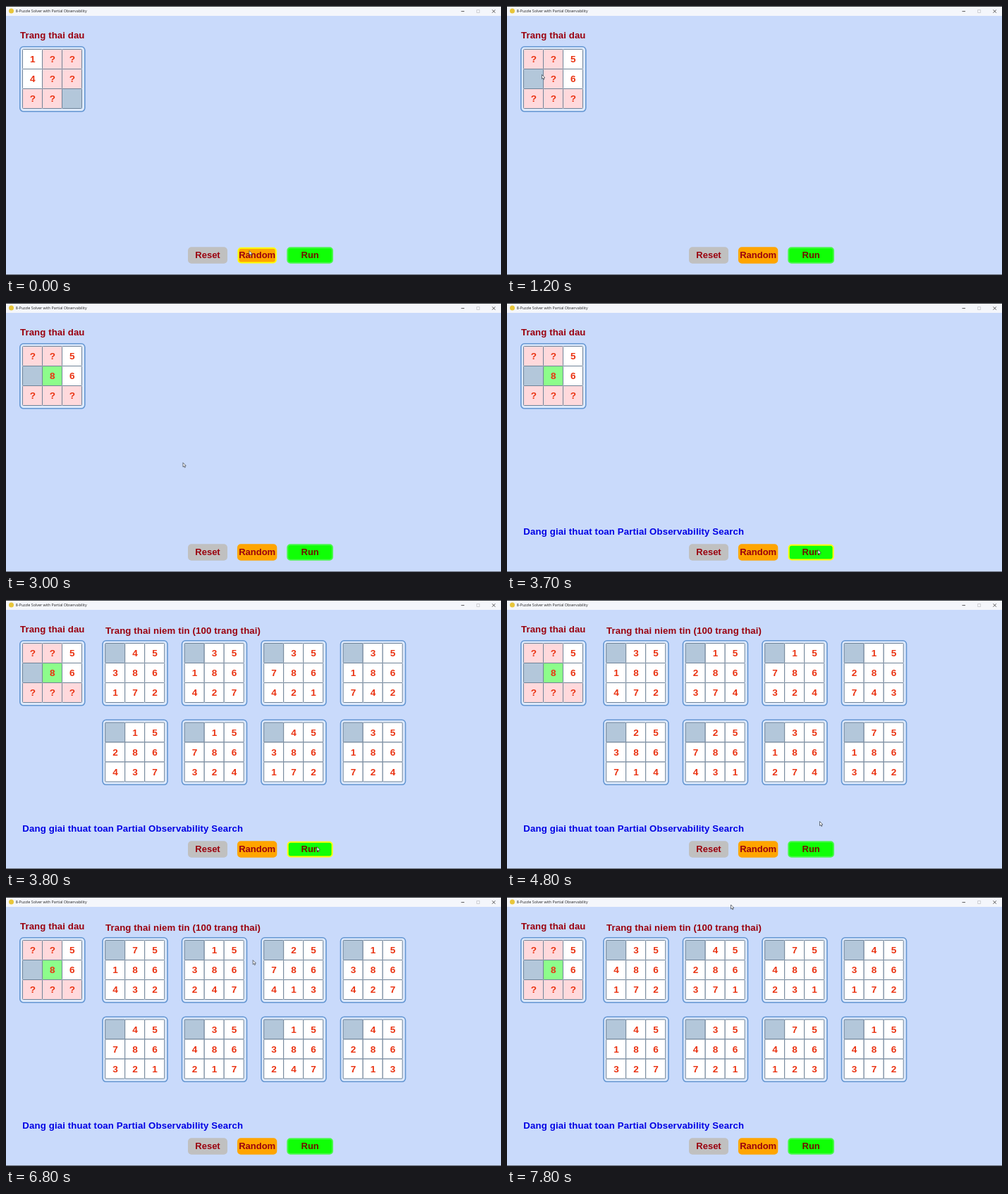
Write an HTML page with a canvas that moves like this. It is 702 by 382 pixels and loops after 8 s.

```html
<!DOCTYPE html>
<html lang="vi">
<head>
<meta charset="utf-8">
<title>8-Puzzle Solver</title>
<style>
  html, body { margin: 0; width: 100%; height: 100%; overflow: hidden; background: #c9dafb; }
  canvas { display: block; }
</style>
</head>
<body>
<canvas id="stage" width="702" height="382"></canvas>
<script>
const ctx = document.getElementById('stage').getContext('2d');
const LOOP = 8000, STEP = 100;
const CELL = 28, BOARD_PITCH = 112.5;
const BELIEF_START = 3800, BELIEF_PERIOD = 1000, BELIEF_COUNT = 8;
const BOLD = '"Liberation Sans", Arial, sans-serif';
const TITLE_BAR = '5.35px "Open Sans", "Noto Sans", sans-serif';
const RED = '#9a000e', BLUE = '#0000e4', DIGIT = '#ea3312';

const pointerHome = { x: 345, y: 347.5 };
const pointerMoves = [
  { from: 400, to: 1200, x: 49.5, y: 97.5 },
  { from: 1200, to: 2000, x: 61, y: 103 },
  { from: 2600, to: 3400, x: 441, y: 350.5 },
  { from: 4100, to: 4500, x: 443.5, y: 314.5 },
  { from: 5800, to: 7300, x: 317.5, y: 11 }
];

function ease(t, from, to) {
  const u = Math.min(1, Math.max(0, (t - from) / (to - from)));
  return u * u * (3 - 2 * u);
}

function pointerAt(t) {
  return pointerMoves.reduce((p, move) => {
    const k = ease(t, move.from, move.to);
    return { x: p.x + (move.x - p.x) * k, y: p.y + (move.y - p.y) * k };
  }, pointerHome);
}

function seededRandom(seed) {
  return () => (seed = (seed * 16807) % 2147483647) / 2147483647;
}

// A belief state places the unseen tiles at random around the known 5, 8 and 6.
function beliefState(random) {
  const tiles = [1, 2, 3, 4, 7];
  const draw = () => tiles.splice(Math.floor(random() * tiles.length), 1)[0];
  return [...'_?5?86???'].map(cell => cell === '?' ? draw() : cell).join('');
}

function box(x, y, w, h, radius, fill, stroke, line = 1) {
  ctx.beginPath();
  ctx.roundRect(x, y, w, h, radius);
  ctx.fillStyle = fill;
  ctx.fill();
  if (!stroke) return;
  ctx.strokeStyle = stroke;
  ctx.lineWidth = line;
  ctx.stroke();
}

function text(str, x, y, color, { font = `bold 13.2px ${BOLD}`, spacing = 0, align = 'left' } = {}) {
  ctx.font = font;
  ctx.letterSpacing = spacing + 'px';
  ctx.textAlign = align;
  ctx.fillStyle = color;
  ctx.fillText(str, x, y);
}

function line(color, x0, y0, x1, y1) {
  ctx.strokeStyle = color;
  ctx.lineWidth = 0.8;
  ctx.beginPath();
  ctx.moveTo(x0, y0);
  ctx.lineTo(x1, y1);
  ctx.stroke();
}

function windowFrame() {
  box(0, 0, 702, 382, 0, '#c9dafb');
  box(0, 0, 702, 14, 0, '#f4f6fb');
  box(0, 0, 702, 1, 0, '#33363b');
  box(0, 381, 702, 1, 0, '#666c78');
  box(4, 3.5, 7, 7, 3.5, '#e8c63a');
  text('8-Puzzle Solver with Partial Observability', 13.7, 9.4, '#222', { font: TITLE_BAR });
  line('#333', 645.5, 7.6, 650, 7.6);
  box(667.6, 5.5, 4, 4, 0, '#f4f6fb', '#c4c6cb', 0.8);
  line('#333', 689.5, 5.3, 693.9, 9.7);
  line('#333', 693.9, 5.3, 689.5, 9.7);
}

// cells: nine characters, '_' is the blank; lit is the index of the selected cell
function board(x, y, cells, lit = -1) {
  box(x + 0.8, y + 0.8, 92, 92, 5, '#deeafc', '#6496d2', 1.6);
  [...cells].forEach((cell, i) => {
    const cx = x + 4.5 + i % 3 * CELL, cy = y + 4.5 + Math.floor(i / 3) * CELL;
    const fill = i === lit ? '#8dfd8b' : { _: '#b3c7da', '?': '#ffd9dc' }[cell] || '#fff';
    box(cx, cy, CELL, CELL, 1, fill, '#6f8398');
    if (cell !== '_')
      text(cell, cx + CELL / 2 + 0.3, cy + 18.8, DIGIT, { font: `bold 13.6px ${BOLD}`, align: 'center' });
  });
}

function button(label, x, w, fill, { rim = fill, hover = false, ink = RED } = {}) {
  const inset = hover ? 1.4 : 1;
  box(x + inset, 342.3 + inset, w - 2 * inset, 23.5 - 2 * inset, 4, fill, hover ? '#ffff00' : rim, 2);
  text(label, x + w / 2, 358.3, ink, { font: `bold 13px ${BOLD}`, align: 'center' });
}

function drawPointer({ x, y }) {
  ctx.save();
  ctx.translate(x, y);
  const arrow = new Path2D('M0 0V6L1.4 4.8L2.4 7L3.4 6.5L2.5 4.5L4.3 4.4Z');
  ctx.fillStyle = '#fff';
  ctx.fill(arrow);
  ctx.strokeStyle = '#333a44';
  ctx.lineWidth = 0.7;
  ctx.stroke(arrow);
  ctx.restore();
}

function draw(t) {
  const pointer = pointerAt(t);
  const over = (x, w) => pointer.y > 342 && pointer.x > x && pointer.x < x + w;
  windowFrame();

  text('Trang thai dau', 20, 46.3, RED, { spacing: 0.1 });
  const start = t < 400 ? '1??4????_' : t < 2600 ? '??5_?6???' : '??5_86???';
  board(19, 57, start, t >= 1500 ? 4 : -1);

  if (t >= 3500)
    text('Dang giai thuat toan Partial Observability Search', 23.3, 329.2, BLUE, { spacing: 0.15 });

  if (t >= BELIEF_START) {
    text('Trang thai niem tin (100 trang thai)', 141, 48.3, RED, { spacing: 0.13 });
    const batch = Math.floor((t - BELIEF_START) / BELIEF_PERIOD);
    const random = seededRandom(90001 * (batch + 1));
    for (let i = 0; i < BELIEF_COUNT; i++)
      board(136.2 + i % 4 * BOARD_PITCH, 57 + Math.floor(i / 4) * BOARD_PITCH, beliefState(random));
  }

  button('Reset', 258, 56, '#c0c0c0');
  button('Random', 328, 56.3, '#ffa500', { hover: over(328, 56.3) });
  button('Run', 398.3, 65.7, '#10ff06', { hover: over(398.3, 65.7), rim: '#48f84a', ink: '#6e1200' });
  drawPointer(pointer);
}

const began = performance.now();
function tick() {
  const t = (performance.now() - began) % LOOP;
  draw(Math.floor(t / STEP) * STEP);
  requestAnimationFrame(tick);
}
tick();
</script>
</body>
</html>
```
